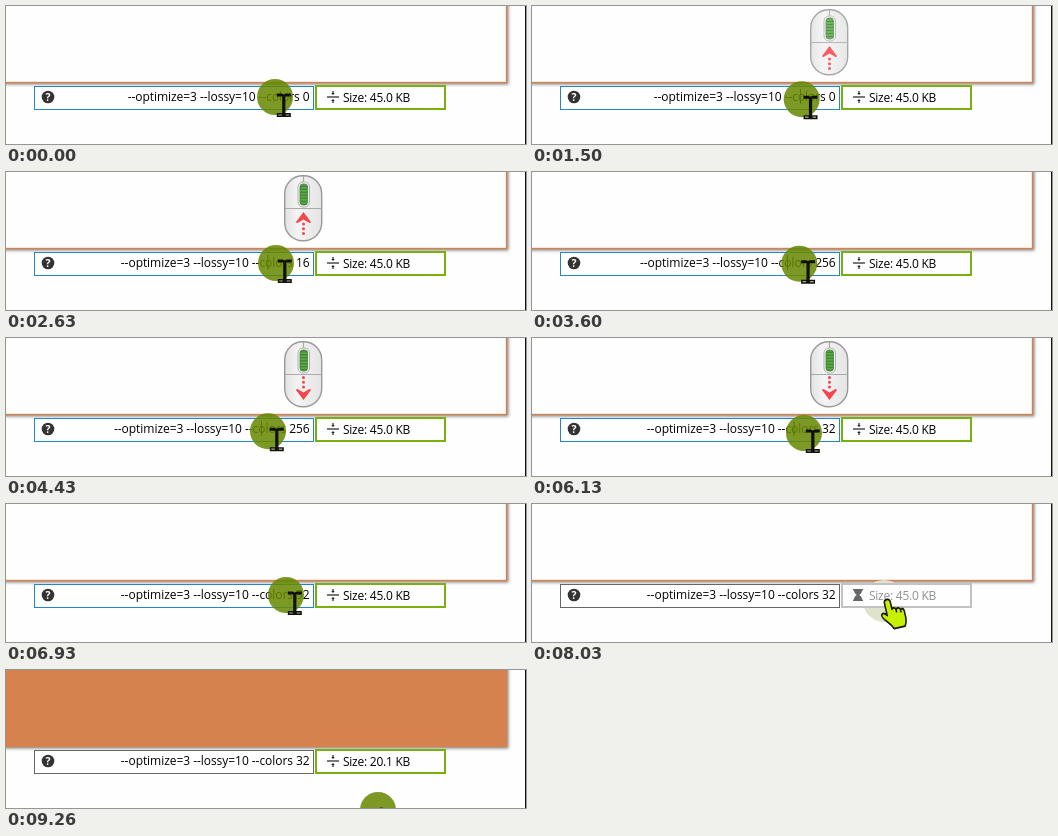
Animation, 520 px wide and 138 px high, one loop 9.33 s. Source, as an HTML page:

```html
<!DOCTYPE html>
<html lang="en">
<head>
<meta charset="utf-8">
<title>Scroll to set colors</title>
<style>
  html, body { margin: 0; width: 100%; height: 100%; overflow: hidden; background: #fefefe; }
  svg { display: block; width: 520px; height: 138px; }
  text { font: 12px "Open Sans", "Noto Sans", sans-serif; fill: #000; }
</style>
</head>
<body>
<svg viewBox="0 0 520 138" xmlns="http://www.w3.org/2000/svg">
  <defs>
    <filter id="blur" x="-5%" y="-20%" width="110%" height="140%"><feGaussianBlur stdDeviation="1.6"/></filter>
    <linearGradient id="body" x2="1" y2="0">
      <stop offset="0" stop-color="#e2e2e2"/><stop offset=".35" stop-color="#f4f4f4"/><stop offset="1" stop-color="#e4e4e4"/>
    </linearGradient>
    <clipPath id="wheelClip"><rect x="294" y="12" width="7.500" height="21" rx="3"/></clipPath>
  </defs>
  <rect width="520" height="138" fill="#fefefe"/>

  <rect x="-20" y="-20" width="522.500" height="98.500" fill="#555" opacity=".7" filter="url(#blur)"/>
  <rect id="panel" x="-10.5" y="-10.5" width="511" height="87" stroke="#d5824f" stroke-width="1.400"/>
  <path d="M519.500 0V138" stroke="#111"/>

  <circle id="glow" r="21" fill="#dfe3cb"/>
  <rect id="field" x="28.500" y="80.500" width="279" height="23" fill="#fff"/>
  <circle cx="42" cy="91" r="6.300" fill="#333"/>
  <text x="42" y="95" text-anchor="middle" style="font-size:10.500px;font-weight:700;fill:#fff">?</text>
  <text id="args" x="303.700" y="95" text-anchor="end" letter-spacing="-.05"></text>
  <path id="caret" d="M.5 83V98" stroke="#111"/>

  <rect id="button" x="310" y="80" width="129" height="23" fill="#fefefe" stroke-width="2"/>
  <g id="ready" fill="#222">
    <rect x="321" y="90.400" width="12" height="1.200"/>
    <path d="M326.400 85h1.200v2h1.200l-1.800 2-1.800-2h1.200zM326.400 97h1.200v-2h1.200l-1.800-2-1.800 2h1.200z"/>
  </g>
  <path id="busy" fill="#666" d="M321 85h10v1.600h-1c0 2.400-1.500 3.600-2.800 4.400 1.300.8 2.800 2 2.800 4.400h1v1.600h-10v-1.600h1c0-2.400 1.500-3.600 2.800-4.400-1.300-.8-2.800-2-2.800-4.400h-1z"/>
  <text id="size" x="337" y="95.500" letter-spacing="-.25"></text>

  <circle id="spot" r="18" fill="#668900"/>
  <g id="beam">
    <path d="M-7 0H-2L0 1 2 0H7V3H1.600V19.500H7V23.500H-7V19.500H-1.600V3H-7Z" fill="#111"/>
    <path d="M-5.500 21.500H-2M2 21.500H5.500" stroke="#a9b573" stroke-width="1.200"/>
  </g>
  <g id="hand">
    <path transform="rotate(-13) scale(.86 1.020)" fill="#c6f000" stroke="#16180a" stroke-width="1.800" stroke-linejoin="round"
      d="M-3.500 2Q-3.500-1.500 0-1.500 3.500-1.500 3.500 2V9Q3.500 8 5.500 8 8 8 8 10.500 8 9 10.500 9 13 9 13 11.500 13 10.500 15 10.500 17 11 17 13.500V20Q17 24 14 28H1Q-1 24-6 19-11 14-9.500 12-7 9.500-3.500 14ZM8 10V13M13 11V14"/>
  </g>

  <g id="mouse">
    <rect x="278.700" y="3.700" width="37" height="65" rx="18" fill="url(#body)" stroke="#999" stroke-width="1.400"/>
    <path d="M279 36.500H315.500M297.500 4V11" fill="none" stroke="#aaa" stroke-width="1.200"/>
    <rect x="292" y="10" width="11.500" height="25" rx="5" fill="#f4f4f4" stroke="#b0b0b0"/>
    <rect x="294" y="12" width="7.500" height="21" rx="3" fill="#5aa845"/>
    <g clip-path="url(#wheelClip)"><path id="ridges" stroke="#3a8230"/></g>
    <rect x="294" y="12" width="7.500" height="21" rx="3" fill="none" stroke="#477f3c" stroke-width=".8"/>
    <g id="arrow" fill="#f4454b">
      <path d="M290 52Q290.500 50.500 292 51.200L297.500 54.500 303 51.200Q304.500 50.500 305 52L297.500 62Z"/>
      <path id="tail" stroke="#f4454b" stroke-width="3" stroke-linecap="round"/>
    </g>
  </g>
</svg>
<script>
const LOOP = 9330;
const $ = id => document.getElementById(id);
const clamp = v => Math.max(0, Math.min(1, v));
const ramp = (t, a, b) => clamp((t - a) / (b - a));
const set = (id, attrs) => { for (const k in attrs) $(id).setAttribute(k, attrs[k]); };
const show = (id, on) => set(id, { visibility: on ? 'visible' : 'hidden' });

// pointer path: time, x, y
const path = [
  [0, 269, 91], [1330, 269, 91], [1750, 271, 97], [2260, 270, 91], [3260, 270, 91],
  [4130, 262, 93], [5130, 262, 94], [6130, 272, 95], [6560, 280, 91], [6930, 280, 91],
  [7660, 352, 97], [9190, 352, 97], [9260, 372, 140]
];
// time, colors value
const values = [
  [0, 0], [1560, 2], [1800, 4], [2040, 8], [2260, 16], [2700, 32], [2880, 64],
  [3030, 128], [3200, 256], [5000, 128], [5500, 64], [5900, 32]
];

function pointer(t) {
  const i = path.findIndex(p => p[0] > t);
  if (i < 0) return path[path.length - 1].slice(1);
  const [t0, x0, y0] = path[i - 1], [t1, x1, y1] = path[i];
  const u = ramp(t, t0, t1), e = u * u * (3 - 2 * u);
  return [x0 + (x1 - x0) * e, y0 + (y1 - y0) * e];
}

function drawMouse(t) {
  const up = t < 3660;
  const alpha = up
    ? ramp(t, 1330, 1530) - ramp(t, 3330, 3530)
    : ramp(t, 3850, 4050) - ramp(t, 6330, 6560);
  set('mouse', { opacity: alpha });
  if (!alpha) return;

  const shift = (t / 40 % 3) * (up ? -1 : 1);
  let d = '';
  for (let y = 8; y < 40; y += 3) d += `M293 ${y + shift}h10`;
  set('ridges', { d });

  const step = Math.floor(t / 170) % 2 ? 0 : 1;
  d = '';
  for (let i = 0; i < 3; i++) d += `M297.5 ${50 - step - i * 4.8}h.01`;
  set('tail', { d });
  set('arrow', { transform: up ? 'matrix(1 0 0 -1 0 102)' : '' });
}

function draw(t) {
  const [x, y] = pointer(t);
  const value = values.filter(v => v[0] <= t).pop()[1];
  const inField = x < 308;
  const busy = t >= 7900 && t < 9200;
  const done = t >= 9200;

  set('panel', { fill: t >= 8340 ? '#d5824f' : '#fefefe' });
  set('field', { stroke: inField ? '#2384cf' : '#666' });
  $('args').textContent = `--optimize=3 --lossy=10 --colors ${value}`;
  set('caret', { transform: `translate(${268 - 6.5 * (String(value).length - 1)} 0)` });
  show('caret', inField && t >= 130 && (t - 130) % 1000 < 570);

  set('button', { stroke: busy ? '#c2c2c2' : '#78b010' });
  show('ready', !busy);
  show('busy', busy);
  $('size').textContent = `Size: ${done ? '20.1' : '45.0'} KB`;
  $('size').style.fill = busy ? '#909090' : '#000';

  // the pressed spot fades to a pale glow behind the button
  const press = done ? 0 : ramp(t, 7830, 8000);
  set('glow', { cx: x, cy: y, opacity: press });
  set('spot', { cx: x, cy: y, opacity: 0.86 * (1 - press) });
  set('beam', { transform: `translate(${x + 8.8} ${y - 3.5})` });
  set('hand', { transform: `translate(${x + 3} ${y})` });
  show('beam', inField);
  show('hand', !inField);
  drawMouse(t);
}

const start = performance.now();
function tick() {
  draw((performance.now() - start) % LOOP);
  requestAnimationFrame(tick);
}
draw(0);
requestAnimationFrame(tick);
</script>
</body>
</html>
```
